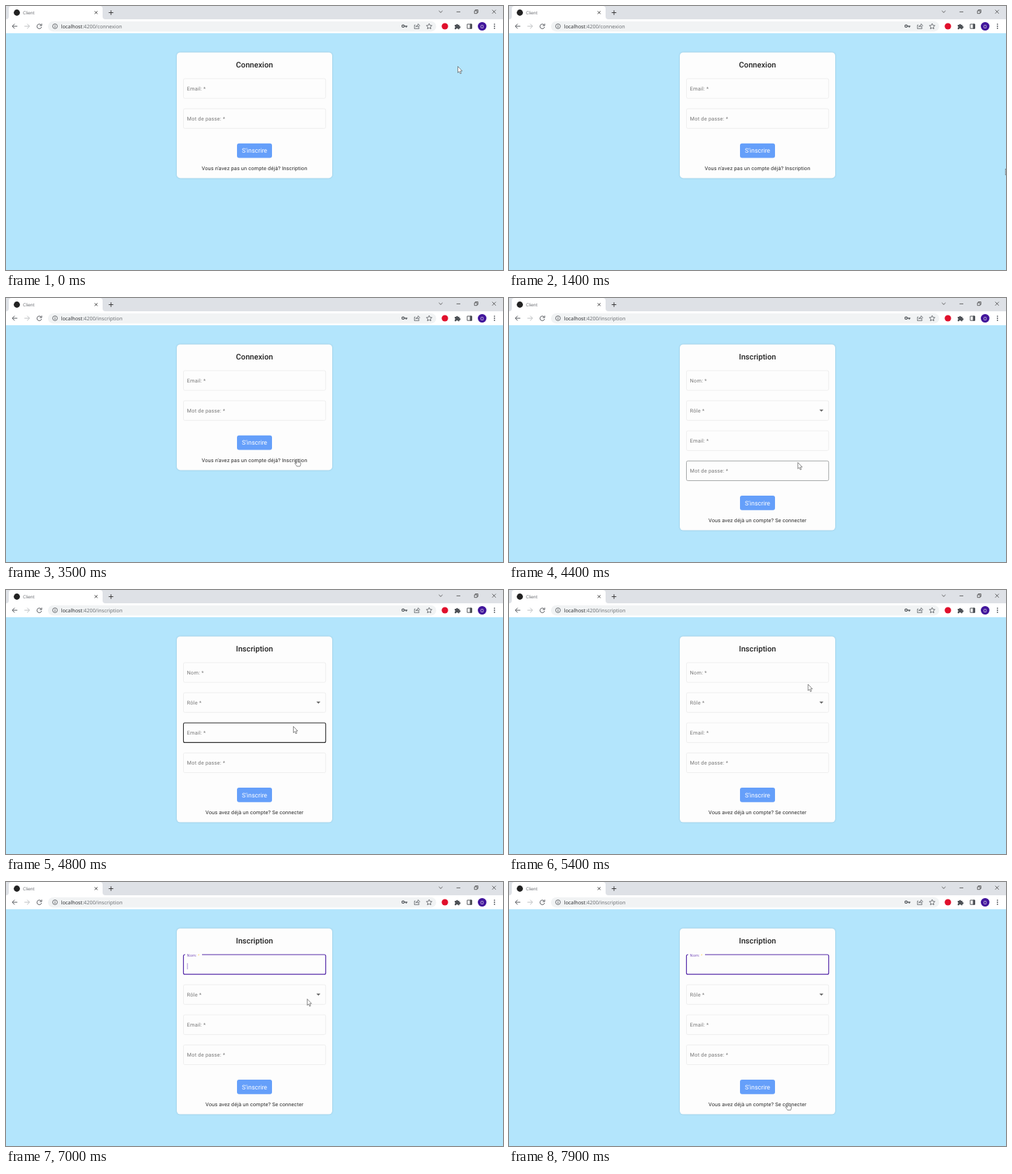
An HTML page for the animation above (8000 ms loop, 710 by 378 pixels).

```html
<!DOCTYPE html>
<html lang="fr">
<head>
<meta charset="utf-8">
<title>Client</title>
<style>
  html, body { margin: 0; width: 100%; height: 100%; overflow: hidden; background: #b3e5fc; }
  svg { display: block; width: 710px; height: 378px; }
  text { font-family: Roboto, Arial, sans-serif; text-rendering: geometricPrecision; }
  .ui { font-family: "Open Sans", "Noto Sans", sans-serif; }
  .ic { fill: none; stroke: #4d5156; stroke-width: .95; }
  .title { font-size: 11.1px; font-weight: 500; fill: #212121; text-anchor: middle; }
  .btn { font-size: 8.95px; fill: #fff; text-anchor: middle; }
  .foot { font-size: 7.39px; letter-spacing: .02em; fill: #2a2a2a; text-anchor: middle; }
  .label { font-size: 7.39px; letter-spacing: .03em; fill: #777; }
  .box { fill: none; stroke: #e8e8e8; stroke-width: .7; }
  .box.enter { stroke: #a6a9a9; stroke-width: 1; }
  .box.hover { stroke: #2c2c2c; stroke-width: 1.1; }
  .box.focus { stroke: #5428a8; stroke-width: 1.2; }
  .card { fill: #fdfdfd; filter: drop-shadow(0 .7px .8px rgba(0, 0, 0, .16)); }
  .cur { fill: #fff; stroke: #3c3c3c; stroke-width: .6; stroke-linejoin: round; }
</style>
</head>
<body>
<svg viewBox="0 0 710 378">
  <rect width="710" height="378" fill="#b3e5fc"/>

  <!-- browser chrome -->
  <rect width="710" height="20" fill="#dee1e6"/>
  <path d="M0 19Q4 19 4 15V4Q4 0 8 0H134Q138 0 138 4V15Q138 19 142 19H710V39H0Z" fill="#fff"/>
  <rect x="60" y="22" width="554.5" height="14.4" rx="7.2" fill="#f1f3f4"/>
  <circle cx="15.5" cy="9.5" r="4.4" fill="#222"/>
  <text class="ui" x="24.3" y="11.9" font-size="6.2" fill="#5a5d62">Client</text>
  <g class="ic">
    <path d="M126.7 7.4l4 4m0-4l-4 4M146.7 9.5h6.6M150 6.2v6.6" stroke="#333"/>
    <g stroke="#444" stroke-width=".8">
      <path d="M618.4 6.9l2.6 2.5 2.6-2.5M643.6 8.4h5.4M694.6 5.6l5.2 5.2m0-5.2l-5.2 5.2"/>
      <path d="M669.2 6.9h3.8v3.8h-3.8zM670.4 6.7v-1.2h3.8v3.9h-1.1"/>
    </g>
    <path d="M16.2 29H9M12.3 25.6L8.9 29l3.4 3.4"/>
    <path d="M26.3 29h7.2M30.2 25.6l3.4 3.4-3.4 3.4" stroke="#babcbe"/>
    <path d="M50.2 27.2A3.3 3.3 0 1 0 50.8 30M51 25.3v2.8h-2.8"/>
    <circle cx="70" cy="29" r="3.4" stroke-width=".8"/>
    <path d="M70 28.6v2.3M70 26.9v.9"/>
    <circle cx="567.3" cy="28.8" r="1.7" stroke-width="1.2"/>
    <path d="M569 28.8h4.4M571.8 28.8v1.9" stroke-width="1.3"/>
    <path d="M585 27.3h-1.6v5.2h6.6v-2M585.3 30.3q.4-3 3.5-3v-1.8l2.4 2.6-2.4 2.6v-1.8q-2.2 0-3.5 1.4z" stroke-width=".7"/>
    <path d="M604.5 25.1l1.2 2.6 2.8.3-2.1 1.9.6 2.8-2.5-1.4-2.5 1.4.6-2.8-2.1-1.9 2.8-.3z" stroke-width=".8"/>
    <path d="M658.9 26h6.4v6.2h-6.4z"/>
    <path d="M663.1 26h2.2v6.2h-2.2z" fill="#4d5156"/>
  </g>
  <circle cx="627" cy="29" r="4.6" fill="#e0102c"/>
  <path d="M641 27h2.1a1.3 1.3 0 1 1 2.6 0h2v2.1a1.3 1.3 0 1 1 0 2.5v1.7h-2.1a1.2 1.2 0 0 0-2.4 0H641v-2.1a1.2 1.2 0 0 0 0-2.3z" fill="#4d5156"/>
  <circle cx="680.2" cy="29.1" r="6.2" fill="#42169c"/>
  <text x="680.2" y="31.6" font-size="7" fill="#eee" text-anchor="middle">O</text>
  <path d="M697.8 26.1v0m0 2.9v0m0 2.9v0" stroke="#4d5156" stroke-width="1.8" stroke-linecap="round"/>
  <text class="ui" x="78.6" y="31.5" font-size="7.3" fill="#65696d"><tspan fill="#26282b">localhost</tspan>:4200/<tspan id="route">connexion</tspan></text>

  <g id="login"></g>
  <g id="signup"></g>

  <g id="cursor">
    <path id="arrow" class="cur" d="M0 0V9L2 7.2 3.4 10.4 4.9 9.8 3.5 6.6H6.2Z"/>
    <path id="hand" class="cur" d="M-.9.8a.9.9 0 0 1 1.8 0V4l2.6.5q1.8.4 1.6 2l-.6 2.6q-.2.7-.5 1.1H-.5q-.6-1.2-1.5-2.2L-3.2 6.2q-.3-1.2.9-1l1.4 1.1z"/>
    <path id="beam" fill="none" stroke="#222" stroke-width=".9" d="M-2.3-4.3H-.6L0-3.8.6-4.3H2.3M0-3.8V3.8M-2.3 4.3H-.6L0 3.8.6 4.3H2.3"/>
  </g>
</svg>
<script>
  const $ = id => document.getElementById(id);
  const LOOP = 8000, STEP = 100;
  const ROUTE = 3500, PAGE = 3600, FOCUS = 6000;
  const TOP = 104, GAP = 43.1, HEIGHT = 28.2;

  const field = (label, i) => {
    const y = TOP + GAP * i;
    return `<rect class="box" x="253.5" y="${y}" width="203.2" height="${HEIGHT}" rx="2"/>
      <text class="label" x="258.6" y="${y + 16.9}">${label} <tspan>*</tspan></text>`;
  };

  const form = (title, labels, foot) => {
    const dy = GAP * (labels.length - 2);
    return `<rect class="card" x="244" y="66.4" width="222" height="${180 + dy}" rx="5"/>
      <text class="title" x="355" y="88">${title}</text>
      ${labels.map(field).join('')}
      <g transform="translate(0 ${dy})">
        <rect x="330" y="196.7" width="50" height="20.8" rx="3" fill="#659ffa"/>
        <text class="btn" x="355" y="210.4">S'inscrire</text>
        <text class="foot" x="355" y="234.6">${foot}</text>
      </g>`;
  };

  $('login').innerHTML = form('Connexion', ['Email:', 'Mot de passe:'],
    "Vous n'avez pas un compte déjà? Inscription");
  $('signup').innerHTML = form('Inscription', ['Nom:', 'Rôle', 'Email:', 'Mot de passe:'],
    'Vous avez déjà un compte? Se connecter') +
    `<path d="M443.4 159.8h5.8l-2.9 2.9z" fill="#666"/>
     <rect id="notch" x="256" y="102.5" width="24" height="2.5" fill="#fdfdfd"/>
     <path id="caret" d="M259.2 116.2v8.8" stroke="#9a78d0" stroke-width=".8"/>`;

  const boxes = [...$('signup').querySelectorAll('.box')];
  const name = $('signup').querySelector('.label');
  const star = name.querySelector('tspan');
  $('signup').insertBefore(name, $('caret'));

  // pointer strokes: start, end, destination and sideways bow
  const moves = [
    { from: 800, to: 1400, x: 709.3, y: 233, bx: 0, by: -8 },
    { from: 1600, to: 2500, x: 428.5, y: 211.5, bx: 0, by: 45 },
    { from: 2700, to: 3000, x: 416, y: 230.8, bx: 0, by: 0 },
    { from: 4300, to: 4400, x: 412.7, y: 235.5, bx: 0, by: 0 },
    { from: 4400, to: 5500, x: 432.3, y: 125, bx: -10, by: 0 },
    { from: 6800, to: 7700, x: 398.4, y: 316.4, bx: 8, by: 0 }
  ];

  function pointerAt(t) {
    let x = 645.5, y = 86.5;
    for (const m of moves) {
      const k = Math.min(1, Math.max(0, (t - m.from) / (m.to - m.from)));
      const bow = 4 * k * (1 - k);
      x += (m.x - x) * k + m.bx * bow;
      y += (m.y - y) * k + m.by * bow;
    }
    return { x, y };
  }

  // index of the sign-up field under the pointer, or -1
  function fieldAt(t) {
    const { y } = pointerAt(t);
    const i = Math.floor((y - TOP) / GAP);
    return t >= PAGE && i < boxes.length && y - TOP - GAP * i <= HEIGHT ? i : -1;
  }

  function onLink(t) {
    const { x, y } = pointerAt(t);
    const top = 226 + (t >= PAGE ? 2 * GAP : 0);
    return x > 381 && x < 431 && y > top && y < top + 12;
  }

  const show = (id, on) => $(id).setAttribute('visibility', on ? 'visible' : 'hidden');

  function drawPointer(t) {
    const { x, y } = pointerAt(t);
    $('cursor').setAttribute('transform', `translate(${x} ${y})`);
    const kind = onLink(t) ? 'hand' : fieldAt(t) === 0 ? 'beam' : 'arrow';
    for (const id of ['arrow', 'hand', 'beam']) show(id, id === kind);
  }

  function drawFields(t) {
    const focus = t >= FOCUS;
    const active = focus ? 0 : fieldAt(t);
    const state = focus ? 'focus' : fieldAt(t - STEP) === active ? 'hover' : 'enter';
    boxes.forEach((b, i) => b.setAttribute('class', i === active ? 'box ' + state : 'box'));

    const lift = Math.min(1, Math.max(0, (t - FOCUS + STEP) / (2 * STEP)));
    const up = focus ? lift : 0;
    name.style.fontSize = 7.39 * (1 - .25 * up) + 'px';
    name.setAttribute('y', TOP + 16.9 - 14 * up);
    name.style.fill = focus ? '#7c55bd' : '';
    star.style.fill = focus ? '#ffd760' : '';
    show('notch', focus);
    show('caret', focus && (t - FOCUS) % 1000 < 500);
  }

  function draw(t) {
    $('route').textContent = t >= ROUTE ? 'inscription' : 'connexion';
    $('login').style.display = t >= PAGE ? 'none' : '';
    $('signup').style.display = t >= PAGE ? '' : 'none';
    drawFields(t);
    drawPointer(t);
  }

  function tick() {
    const t = performance.now() % LOOP;
    draw(Math.floor(t / STEP) * STEP);
    requestAnimationFrame(tick);
  }
  tick();
</script>
</body>
</html>
```
